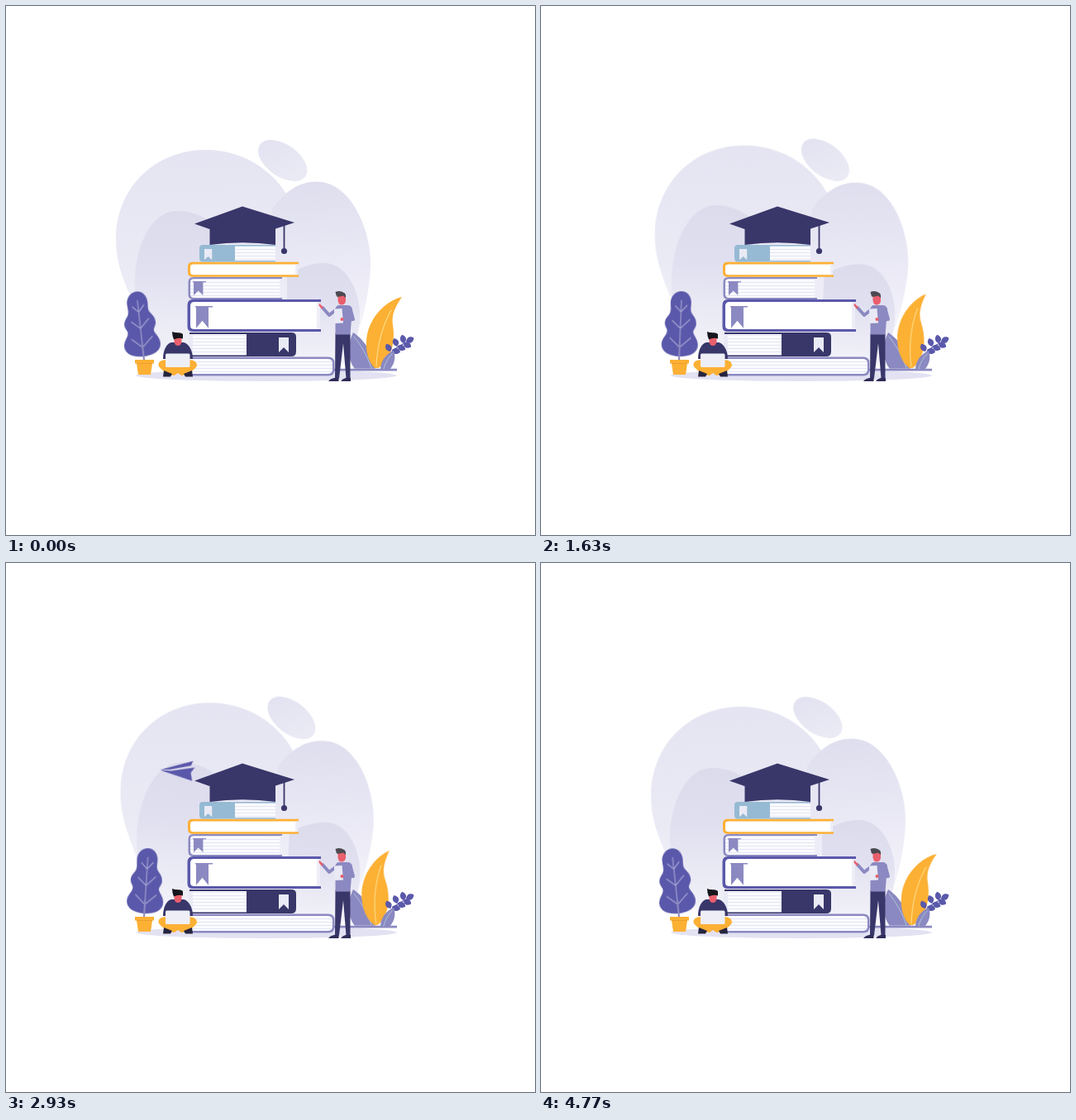
These frames come from a looping animation (640 px wide and 640 px high, 4.81 s). An HTML page without scripts:

```html
<!DOCTYPE html>
<html lang="en">
<head>
<meta charset="utf-8">
<title>Books and learning</title>
<style>
  html, body { margin: 0; width: 100%; height: 100%; overflow: hidden; background: #fff; }
  svg { display: block; width: 100vw; height: 100vh; }

  .navy { fill: #39366a; }
  .indigo { fill: #5a58aa; }
  .lilac { fill: #8b89c1; }
  .yellow { fill: #fcb034; }
  .blue { fill: #96bad3; }
  .paper { fill: #fff; }
  .edge { fill: #eeeef8; }
  .mist { fill: #e9eaf5; }
  .skin { fill: #e95f6c; }
  .line { fill: none; stroke-linecap: round; stroke-linejoin: round; }

  .sway, .drift { animation: 2.405s linear infinite alternate; }
  .tree { transform-origin: 167px 428px; animation-name: tree; }
  .leaf { transform-origin: 448px 438px; animation-name: leaf; }
  .drift { transform-origin: 316px 380px; animation-name: drift; }
  .plane { animation: fly 4.81s linear infinite; }

  @keyframes tree { from { transform: rotate(-6.4deg); } to { transform: rotate(6.5deg); } }
  @keyframes leaf { to { transform: rotate(-12.6deg); } }
  @keyframes drift {
    from { transform: translateY(0) rotate(0deg); }
    50% { transform: translateY(-3.5px) rotate(2deg); }
    to { transform: translateY(1px) rotate(4.1deg); }
  }
  @keyframes fly {
    0%, 38.8% { transform: translate(472px, 186px) rotate(-2deg); opacity: 0; }
    40.2% { opacity: 1; }
    45.1% { transform: translate(411px, 195.5px) rotate(0deg); }
    53% { transform: translate(299px, 218px) rotate(4deg); }
    60.9% { transform: translate(187px, 250px) rotate(8deg); }
    66% { opacity: 1; }
    67.4%, 100% { transform: translate(127px, 272px) rotate(10deg); opacity: 0; }
  }
</style>
</head>
<body>
<svg viewBox="0 0 640 640" xmlns="http://www.w3.org/2000/svg">
  <defs>
    <linearGradient id="lobe" gradientUnits="userSpaceOnUse" x1="220" y1="174" x2="235" y2="430">
      <stop stop-color="#e5e4f2"/><stop offset=".55" stop-color="#eaeaf5"/><stop offset="1" stop-color="#f8f8fc"/>
    </linearGradient>
    <linearGradient id="bump" gradientUnits="userSpaceOnUse" x1="370" y1="212" x2="385" y2="435">
      <stop stop-color="#dfdeee"/><stop offset=".5" stop-color="#ebeaf6"/><stop offset="1" stop-color="#fafafd"/>
    </linearGradient>
    <linearGradient id="hill" x2="0" y2="1">
      <stop stop-color="#dcdbec"/><stop offset=".4" stop-color="#e1e0f0"/><stop offset="1" stop-color="#f3f3f9"/>
    </linearGradient>
    <linearGradient id="pebble" x2="1" y2=".3">
      <stop stop-color="#e2e1f0"/><stop offset="1" stop-color="#eaeaf5"/>
    </linearGradient>
    <pattern id="pages" width="8" height="4" patternUnits="userSpaceOnUse">
      <path fill="#fbfbfe" d="M0 0h8v4H0z"/><path fill="#e2e5f3" d="M0 2h8v1H0z"/>
    </pattern>
    <path id="ribbon" d="M0 0h12v18l-6-6-6 6z"/>
    <path id="leaflet" d="M0 0C-6-2-6-7-3-10 3-8 4-4 0 0z"/>
  </defs>

  <!-- backdrop -->
  <g class="drift">
    <path fill="url(#lobe)" d="M133 282C133 220 180 174 242 174 286 174 324 199 341 231L360 440H205C182 420 166 388 151 352 140 327 133 308 133 282z"/>
    <path fill="url(#bump)" d="M322 246C336 225 354 212.500 376 212.500 416 212.500 441 268 441 312 440 352 428 402 405 440H300z"/>
    <path fill="url(#hill)" d="M158 366C148 305 171 248 207 248 226 248 242 256 252 264V430H205C182 415 166 390 158 366z"/>
    <path fill="url(#hill)" d="M340 326C356 316 370 311 385 311 410 311 428 342 428 374 428 398 420 418 409 433H340z"/>
    <ellipse fill="url(#pebble)" rx="33.6" ry="19.4" transform="translate(334.7 187) rotate(35)"/>
  </g>
  <ellipse cx="315" cy="447" rx="158" ry="7" fill="#e3e2f2"/>

  <!-- plane -->
  <g class="plane indigo">
    <path d="M0 0 38-16 36-10 12-2z"/>
    <path d="M0 .5 13-.5 41-8.500 37-1.500 40 8z"/>
  </g>

  <!-- potted tree -->
  <g class="sway tree">
    <path class="indigo" d="M167 345C174 345 179 351 179 359 179 364 178 367 180 371 183 375 186 378 186 384 186 389 182 391 183 395 185 400 189 403 189 410 189 419 179 424 167 424 155 424 145 419 145 410 145 403 150 400 151 395 152 391 148 389 148 384 148 378 153 375 154 371 155 367 154 364 154 359 154 351 160 345 167 345z"/>
    <path class="line" stroke="#a3a1d1" stroke-width="1.200" d="M167 430V356M167 370l-7-7M167 370l7-8M167 390l-10-9M167 390l11-11M167 413l-12-11M167 413l13-12"/>
    <path class="line" stroke="#8b89c1" stroke-width="2.200" d="M167 430V408"/>
  </g>
  <path class="yellow" d="M156 428h23v4.500h-2l-2 13.500h-15l-2-13.500h-2z"/>
  <path fill="#eaa02c" d="M158 432h19v1h-19z"/>

  <!-- plants on the right -->
  <path class="lilac" d="M350 438.800H473V441.500H350zM447 439C444 420 433 403 420 395 413 409 413 428 422 439z"/>
  <path class="line" stroke="#abc4dc" stroke-width="1" d="M442 438C437 423 430 411 421 400"/>
  <g class="sway leaf">
    <path class="yellow" d="M446 438C434 426 433 402 441 385 449 368 463 356 479 352 471 364 466 373 468 386 470 398 469 412 464 422 460 430 455 436 450 438z"/>
    <path class="line" stroke="#fedc85" stroke-width="1.200" d="M448 436C449 410 456 386 466 368"/>
  </g>
  <path class="line" stroke="#5a58aa" stroke-width="1.200" d="M458 433C462 420 472 411 490 405"/>
  <g class="indigo">
    <use href="#leaflet" transform="translate(465 418) rotate(-10)"/>
    <use href="#leaflet" transform="translate(473 412) rotate(-2)"/>
    <use href="#leaflet" transform="translate(481 408) rotate(8)"/>
    <use href="#leaflet" transform="translate(484 406) rotate(82)"/>
    <use href="#leaflet" transform="translate(467 416) rotate(122)"/>
    <use href="#leaflet" transform="translate(474 411) rotate(134)"/>
    <use href="#leaflet" transform="translate(481 407.500) rotate(136)"/>
  </g>
  <path class="lilac" d="M453 440C453 430 459 421 469 417 472 424 470 434 464 440z"/>
  <path class="line" stroke="#abc4dc" stroke-width="1" d="M457 439C459 431 463 425 467 421"/>

  <!-- books, bottom to top -->
  <path class="lilac" d="M224 424.500H390Q397.500 424.500 397.500 432V440Q397.500 447.500 390 447.500H224z"/>
  <path fill="url(#pages)" d="M224 427H389Q395 427 395 432V440Q395 445 389 445H224z"/>

  <path class="navy" d="M222 395H345Q351 395 351 400V418Q351 424 345 424H222z"/>
  <path fill="url(#pages)" d="M226 397H291V422.500H226z"/>
  <path class="mist" d="M221 397h5v25.500h-5z"/>
  <use href="#ribbon" class="mist" x="330" y="401"/>

  <path class="indigo" d="M381 355H226Q219.500 355 219.500 362V388Q219.500 394 226 394H381V391H376V358H381z"/>
  <path class="paper" d="M376 358H228Q223 358 223 363V387Q223 391 228 391H376z"/>
  <path class="edge" d="M376 358h4v33h-4z"/>
  <path class="lilac" d="M229 363h21v1.500h-21z"/>
  <use href="#ribbon" class="lilac" transform="translate(230 363) scale(1.250 1.480)"/>

  <path class="lilac" d="M334 328H227Q220.500 328 220.500 334V349Q220.500 355 227 355H334z"/>
  <path fill="url(#pages)" d="M334 330H228Q223 330 223 334V349Q223 353 228 353H334z"/>
  <path class="edge" d="M331 330h3v23h-3z"/>
  <path class="lilac" d="M226 333h16v1.200h-16z"/>
  <use href="#ribbon" class="lilac" transform="translate(227 333) scale(.95)"/>

  <path class="yellow" d="M354 309.800H226Q220 309.800 220 315V322Q220 327.800 226 327.800H354V325.200H350V312.400H354z"/>
  <path class="paper" d="M351 312.400H227Q223 312.400 223 315V322Q223 325.200 227 325.200H351z"/>
  <path class="edge" d="M350 312.400h3v12.800h-3z"/>

  <path class="blue" d="M326 289H238Q234 289 234 293V305Q234 309.500 238 309.500H326z"/>
  <path fill="url(#pages)" d="M277 290.500h49v17.500h-49z"/>
  <use href="#ribbon" class="mist" transform="translate(240 294) scale(.77 .74)"/>

  <!-- graduation cap -->
  <path class="navy" d="M228 263.500 286 242.500 349 262 326 269.500V289Q286 283.500 246.500 289V270z"/>
  <path class="line" stroke="#39366a" stroke-width="1.800" d="M336.500 265V296"/>
  <circle class="navy" cx="336.500" cy="296.500" r="3.600"/>

  <!-- seated reader -->
  <path class="navy" d="M200 407C194 408 190 417 190 427H226C226 417 221 408 215 407z"/>
  <path class="skin" d="M203.500 400H212.500V406Q212 411 208 411T203.500 406z"/>
  <path fill="#17161d" d="M201 394C205 396 210 394 214 397V402.500Q209 400.500 203 403.500 201 399 201 394z"/>
  <path class="yellow" d="M194 428C187 428 184 431 184.500 435 187 440 196 446 204 447L208 444 212 447C220 446 229 440 231 435 231 431 228 428 221 428z"/>
  <path fill="#26243f" d="M191 441 201 445 199 448.500H190zM225 441 215 445 217 448.500H226z"/>
  <rect x="193" y="420.500" width="29.500" height="16.500" rx="1.500" fill="#eeeff6"/>

  <!-- standing teacher -->
  <path class="navy" d="M398.500 396H416.500L416.500 450.500H411.500L408 408 403 450.500H398z"/>
  <path fill="#302d59" d="M390 454Q392 451 397 450H402.500V454zM405 454Q407 451 411 450H417V454z"/>
  <path class="line" stroke="#8b89c1" stroke-width="4" d="M400 367 391 374 383 365"/>
  <path class="skin" d="M379 359.500 384 364.500 382 366.500 378.500 362.500z"/>
  <path class="lilac" d="M402 362H413Q418 362 419 367L416.500 397.500H398.500V367Q399 363 402 362z"/>
  <path class="line" stroke="#8b89c1" stroke-width="4" d="M416.500 366 420 379 409 380"/>
  <path class="mist" d="M397 366.500 406.500 366 408 383.500 397.500 384z"/>
  <circle class="skin" cx="406.500" cy="379" r="2"/>
  <path class="skin" d="M401.500 350H411V357Q410 361.500 406 361.500T401.500 356z"/>
  <path fill="#4b4a50" d="M398.500 346Q404 343.500 409 347 411.500 348 411 353L408 350.500Q404 352 400 351.500z"/>
</svg>
</body>
</html>
```
